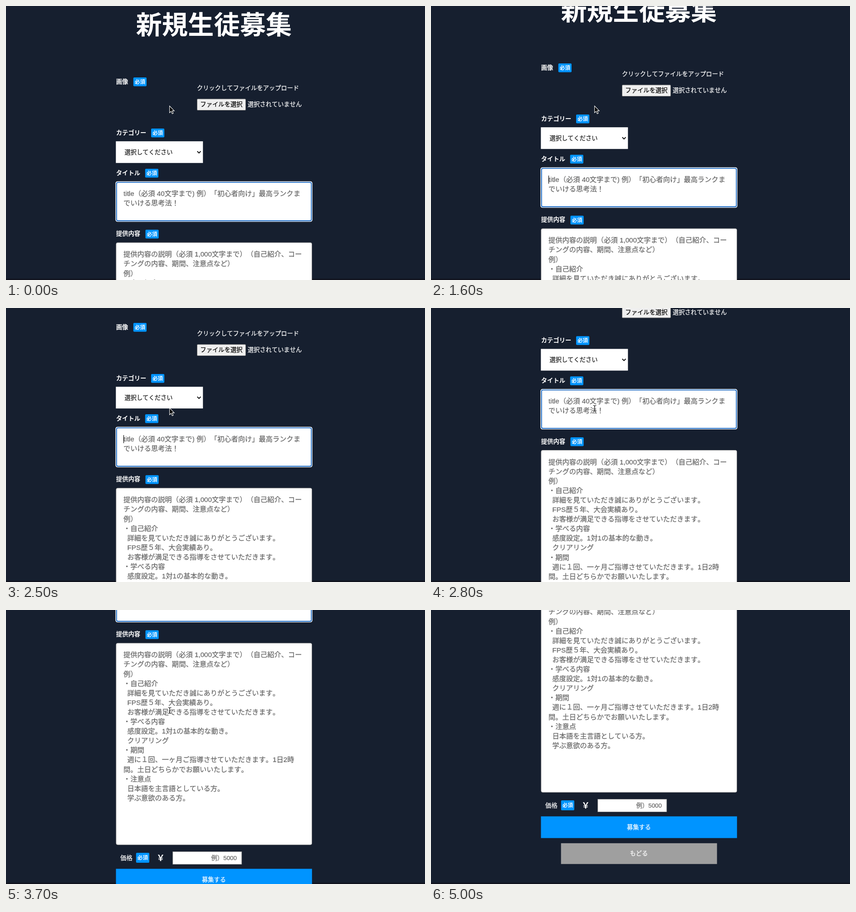
Recreate the animation shown at these times as an HTML page. Size 924 px wide and 606 px high, loop 5.6 s.

```html
<!DOCTYPE html>
<html lang="ja">
<head>
<meta charset="utf-8">
<title>新規生徒募集</title>
<style>
html, body { margin: 0; width: 100%; height: 100%; overflow: hidden; background: #161f2f; }
svg { display: block; width: 100%; height: 100%; }
text {
  font-family: "Liberation Sans", "Noto Sans CJK JP", "Noto Sans CJK", sans-serif;
  font-kerning: none;
  text-spacing-trim: space-all;
  white-space: pre;
}
</style>
</head>
<body>
<svg id="stage" viewBox="0 0 924 606">
  <defs>
    <path id="bar" d="M358 215.5q3 0 3 2v9q0 2-3 2M364 215.5q-3 0-3 2M361 226.5q0 2 3 2M359.3 223.5h3.4"/>
  </defs>
  <rect width="924" height="606" fill="#161f2f"/>
  <rect y="603" width="924" height="3" fill="#11141f"/>
  <g id="page"></g>
  <path id="arrow" d="M360.7 221v15l3.4-3.1 2.4 5.4 2.4-1.1-2.4-5.3h4.6z" fill="#000" stroke="#fff" stroke-width="1.1"/>
  <g id="beam" fill="none" stroke-linecap="round">
    <use href="#bar" stroke="#fff" stroke-width="2.8"/>
    <use href="#bar" stroke="#000" stroke-width="1.2"/>
  </g>
</svg>
<script>
const NS = 'http://www.w3.org/2000/svg';
const byId = id => document.getElementById(id);
const page = byId('page'), arrow = byId('arrow'), beam = byId('beam');
const BLUE = '#0094ff', HINT = '#666', EDGE = '#858585';
const FIELD = 15.27, SMALL = 13.25, LINE = 21.1;

function add(tag, attrs) {
  const el = document.createElementNS(NS, tag);
  for (const k in attrs) el.setAttribute(k, attrs[k]);
  return page.appendChild(el);
}

function box(x, y, width, height, fill, more = {}) {
  return add('rect', { x, y, width, height, fill, ...more });
}

// cy is the middle of the ideographic em box; the thin stroke thickens the strokes a little
function label(str, x, cy, size = SMALL, fill = '#fff', more = {}) {
  const el = add('text', {
    x, y: cy + size * 0.38, 'font-size': size,
    fill, stroke: fill, 'stroke-width': 0.25, ...more
  });
  el.textContent = str;
}

const bold = { 'font-weight': 700, 'stroke-width': 0 };
const middle = { 'text-anchor': 'middle' };

function badge(x, y, h = 19.6) {
  box(x, y, 29.2, h, BLUE, { rx: 2 });
  label('必須', x + 14.6, y + h / 2 - 0.2, 11.6, '#fff', { ...bold, ...middle });
}

function heading(str, cy, badgeX) {
  label(str, 242.7, cy - 0.3, 13.35, '#fff', bold);
  badge(badgeX, cy - 9);
}

function lines(list, cy) {
  list.forEach((str, i) => label(str, 259, cy + i * LINE, FIELD, HINT));
}

label('新規生徒募集', 286.5, 40, 57.3, '#fff', bold);

heading('画像', 167, 280.8);
label('クリックしてファイルをアップロード', 421, 180.8);
box(421.5, 205.7, 107, 24.8, '#efefef', { rx: 1.5, stroke: '#767676' });
label('ファイルを選択', 475, 217.4, 13.35, '#000', middle);
label('選択されていません', 533, 217.4);

heading('カテゴリー', 280, 320);
box(242.3, 299.2, 192, 48, '#fff');
label('選択してください', 261.5, 322.8, SMALL, '#1c1c1c');
add('path', { d: 'M421.8 321.3l3.8 3.8 3.8-3.8', fill: 'none', stroke: '#111', 'stroke-width': 2 });

heading('タイトル', 369, 306.8);
box(241.4, 387.8, 434.3, 89.5, '#fff', { rx: 4.5 });
box(243.8, 390.1, 429.6, 84.9, '#fff', { rx: 3, stroke: '#1464c0', 'stroke-width': 1.9 });
lines(['title（必須 40文字まで) 例）「初心者向け」最高ランクま', 'でいける思考法！'], 414.3);
const caret = box(259, 406, 1.1, 18, '#000');

heading('提供内容', 503.7, 307.5);
box(242.8, 523.2, 431.8, 446.1, '#fff', { rx: 3.5, stroke: EDGE, 'stroke-width': 0.8 });
lines([
  '提供内容の説明（必須 1,000文字まで）（自己紹介、コー',
  'チングの内容、期間、注意点など）',
  '例）',
  '・自己紹介',
  '  詳細を見ていただき誠にありがとうございます。',
  '  FPS歴５年、大会実績あり。',
  '  お客様が満足できる指導をさせていただきます。',
  '・学べる内容',
  '  感度設定。1対1の基本的な動き。',
  '  クリアリング',
  '・期間',
  '  週に１回、一ヶ月ご指導させていただきます。1日2時',
  '間。土日どちらかでお願いいたします。',
  '・注意点',
  '  日本語を主言語としている方。',
  '  学ぶ意欲のある方。'
], 548.5);

label('価格', 252, 998.3, 13.4);
badge(286.8, 986.9, 22);
label('￥', 341, 997.9, 18, '#fff', { ...bold, ...middle });
box(367.8, 984.4, 152, 28, '#fff', { stroke: EDGE, 'stroke-width': 0.9 });
label('例）5000', 509, 998.3, 13.4, HINT, { 'text-anchor': 'end' });

box(242.5, 1022.4, 432.3, 48, BLUE);
label('募集する', 458.5, 1046.1, SMALL, '#fff', middle);
box(286.7, 1081.8, 344, 46, '#9f9f9f');
label('もどる', 458.5, 1104.4, SMALL, '#fff', middle);

// scroll distance over time, joined by a monotone cubic
const stops = [[900, 0], [1600, 31], [2500, 125], [3100, 309], [3700, 450],
  [4100, 528.6], [4200, 540], [4800, 566]];
const slopes = stops.slice(1).map((p, i) => (p[1] - stops[i][1]) / (p[0] - stops[i][0]));
const tangents = stops.map((p, i) => {
  const a = slopes[i - 1], b = slopes[i];
  return a && b ? 2 * a * b / (a + b) : 0;
});

function scrollAt(t) {
  const last = stops.length - 1;
  if (t <= stops[0][0]) return 0;
  if (t >= stops[last][0]) return stops[last][1];
  const i = stops.findIndex(p => p[0] > t) - 1;
  const [t0, y0] = stops[i], [t1, y1] = stops[i + 1];
  const d = t1 - t0, u = (t - t0) / d, v = 1 - u;
  return y0 * (1 + 2 * u) * v * v + y1 * u * u * (3 - 2 * u)
    + d * u * v * (tangents[i] * v - tangents[i + 1] * u);
}

const LOOP = 5600, STEP = 100, POINTER_END = 4600;
const show = (el, on) => el.setAttribute('visibility', on ? 'visible' : 'hidden');

function draw(now) {
  const t = Math.floor((now % LOOP) / STEP) * STEP;
  const scroll = scrollAt(t);
  const y = 222 + scroll;
  const overField = (y > 388 && y < 477) || (y > 523 && y < 969);
  const blink = t % 1000;
  page.setAttribute('transform', `translate(0 ${-scroll.toFixed(2)})`);
  show(caret, blink >= 300 && blink < 800);
  show(arrow, t < POINTER_END && !overField);
  show(beam, t < POINTER_END && overField);
}

const start = performance.now();
function tick() {
  draw(performance.now() - start);
  requestAnimationFrame(tick);
}
tick();
</script>
</body>
</html>
```
